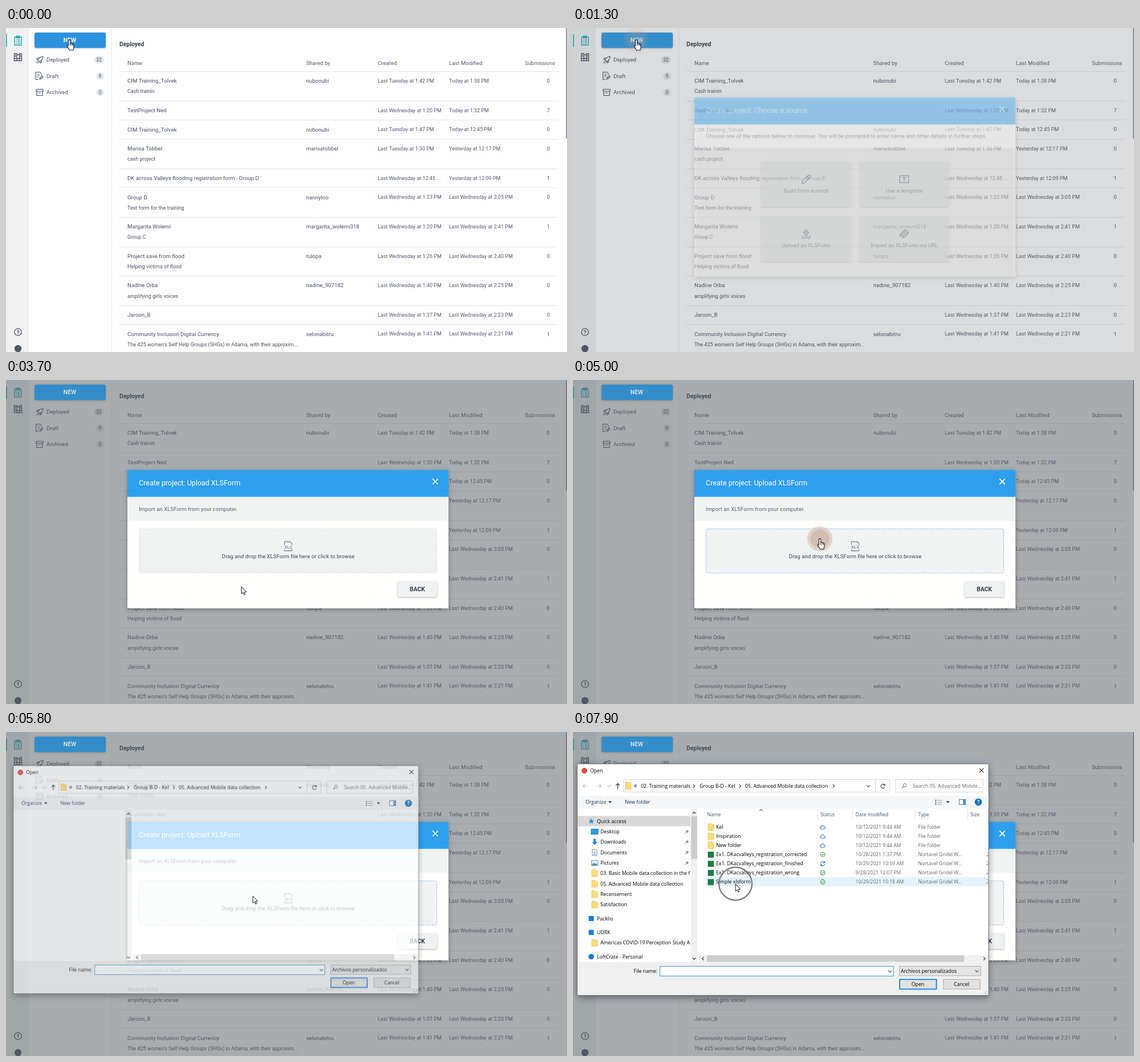
Animation, 984 px wide and 569 px high, one loop 8000 ms. Source, as an HTML page with a canvas:

```html
<!DOCTYPE html>
<html lang="en">
<head>
<meta charset="utf-8">
<title>Upload a form</title>
<style>
html, body { margin: 0; width: 100%; height: 100%; overflow: hidden; background: #fff; }
canvas { display: block; }
</style>
</head>
<body>
<canvas id="stage" width="984" height="569"></canvas>
<script>
const W = 984, H = 569, LOOP = 8000, STEP = 100;
const screen2d = document.getElementById('stage').getContext('2d');
const layer = document.createElement('canvas');
layer.width = W;
layer.height = H;
const layer2d = layer.getContext('2d');
let c = screen2d;

const PAGE = 'Roboto, sans-serif', DIALOG = '"Open Sans", "Noto Sans", sans-serif';
const INK = '#4b5260', SOFT = '#575e6b', BLUE = '#2f9fed';
const clamp = v => Math.max(0, Math.min(1, v));
const mix = (a, b, p) => a + (b - a) * p;

// ---- drawing helpers ----
function text(s, x, y, size = 9.67, color = INK, align = 'left', weight = 400, family = PAGE) {
  c.font = `${weight} ${size}px ${family}`;
  c.textAlign = align;
  c.fillStyle = color;
  c.fillText(s, x, y + size * 0.355);
}
const label = (s, x, y, color = '#000', align = 'left', size = 8.7) =>
  text(s, x, y, size, color, align, 400, DIALOG);

function rect(x, y, w, h, fill, stroke, lw = 1) {
  if (fill) { c.fillStyle = fill; c.fillRect(x, y, w, h); }
  if (stroke) { c.strokeStyle = stroke; c.lineWidth = lw; c.strokeRect(x, y, w, h); }
}
function round(x, y, w, h, r, fill) {
  c.beginPath();
  c.roundRect(x, y, w, h, r);
  c.fillStyle = fill;
  c.fill();
}
function disc(x, y, r, fill) {
  c.beginPath();
  c.arc(x, y, r, 0, 7);
  c.fillStyle = fill;
  c.fill();
}
function circle(x, y, r, color, lw = 1) {
  c.beginPath();
  c.arc(x, y, r, 0, 7);
  c.strokeStyle = color;
  c.lineWidth = lw;
  c.stroke();
}
// Path given relative to (x, y)
function path(d, x, y, stroke, lw = 1.2, fill) {
  c.save();
  c.translate(x, y);
  const p = new Path2D(d);
  if (fill) { c.fillStyle = fill; c.fill(p); }
  if (stroke) {
    c.strokeStyle = stroke;
    c.lineWidth = lw;
    c.lineJoin = 'round';
    c.stroke(p);
  }
  c.restore();
}
function shadowed(color, blur, dy, draw) {
  c.save();
  c.shadowColor = color;
  c.shadowBlur = blur;
  c.shadowOffsetY = dy;
  draw();
  c.restore();
}
function clipped(x, y, w, h, draw) {
  c.save();
  c.beginPath();
  c.rect(x, y, w, h);
  c.clip();
  draw();
  c.restore();
}
const cross = (x, y, r, color, lw) => path(`M${-r} ${-r}L${r} ${r}M${r} ${-r}L${-r} ${r}`, x, y, color, lw);
const chevron = (x, y, color = '#555', turn = 0) => {
  c.save();
  c.translate(x, y);
  c.rotate(turn * Math.PI / 2);
  path('M-2.8 -1.5L0 1.5L2.8 -1.5', 0, 0, color, 1.1);
  c.restore();
};

// ---- project list page ----
const ROWS = [
  ['CIM Training_Tolvek', 'Cash trainin', 'nubonubi', 'Last Tuesday at 1:42 PM', 'Today at 1:38 PM', 0],
  ['TestProject Ned', '', '', 'Last Wednesday at 1:20 PM', 'Today at 1:32 PM', 7],
  ['CIM Training_Tolvek', '', 'nubonubi', 'Last Tuesday at 1:47 PM', 'Today at 12:45 PM', 0],
  ['Marisa Tobbel', 'cash project', 'marisatobbel', 'Last Tuesday at 1:30 PM', 'Yesterday at 12:17 PM', 0],
  ['DK across Valleys flooding registration form - Group D', '', '', 'Last Wednesday at 12:45 ...', 'Yesterday at 12:09 PM', 1],
  ['Group D', 'Test form for the training', 'nannyloo', 'Last Wednesday at 1:23 PM', 'Last Wednesday at 3:05 PM', 0],
  ['Margarita Wolemi', 'Group C', 'margarita_wolemi318', 'Last Wednesday at 1:20 PM', 'Last Wednesday at 2:41 PM', 1],
  ['Project save from flood', 'Helping victims of flood', 'tulopa', 'Last Wednesday at 1:26 PM', 'Last Wednesday at 2:40 PM', 0],
  ['Nadine Orba', 'amplifying girls voices', 'nadine_907182', 'Last Wednesday at 1:40 PM', 'Last Wednesday at 2:25 PM', 0],
  ['Jaroon_B', '', '', 'Last Wednesday at 1:37 PM', 'Last Wednesday at 2:23 PM', 0],
  ['Community Inclusion Digital Currency', 'The 425 women\u2019s Self Help Groups (SHGs) in Adama, with their approxim...',
    'selonabitru', 'Last Wednesday at 1:41 PM', 'Last Wednesday at 2:21 PM', 1]
];

function rail() {
  rect(0, 0, 40, H, '#f0f2f2');
  rect(0, 11, 1.6, 22, '#1bb4c0');
  const teal = '#19a9b5';
  path('M-6 -6H6V8H-6ZM-3 -8H3V-4.5H-3ZM-3.5 -1H-2M-.5 -1H3.5M-3.5 2H-2M-.5 2H3.5M-3.5 5H-2M-.5 5H3.5', 21, 22, teal, 1.3);
  path('M-6.5 -6H-2V6.5H-6.5ZM-2 -4H2.5V6.5H-2ZM2.5 -6H6.5V6.5H2.5ZM-6.5 2.5H6.5M-4.3 -4V0M4.5 -4V0', 21, 51, INK, 1.3);
  circle(21, 534, 6.2, INK, 1.3);
  text('?', 21, 534.3, 9.5, INK, 'center', 700);
  disc(21, 563, 6.2, '#505764');
}

function sidebar() {
  rect(185, 0, 1, H, '#e9ebec');
  path('M6 -6Q0 -6 -3 1L-1 3Q6 0 6 -6ZM-2.5 -1H-5.5L-3.5 -3.5H-.5M1 2.5V5.5L3.5 3.5V.5M-3.5 2.5L-6 5.5M-1.5 4L-3 6', 59, 56, INK, 1.1);
  path('M4 -1V-4L2 -6.5H-5.5V6.5H-1M-3 -3H1M-3 0H1M-3 3H-1M1 6L1.5 3.5L5.5 -.2L7 1.5L3 5.5Z', 58, 84, INK, 1.1);
  path('M-6 -5.5H6V-2H-6ZM-5 -2V5.5H5V-2M-2 1H2', 59, 113, INK, 1.2);
  [['Deployed', 32, 56, 163], ['Draft', 6, 84.5, 165], ['Archived', 0, 113, 165]].forEach(([name, n, y, x]) => {
    text(name, 71, y, 9.75);
    const w = n > 9 ? 17 : 13;
    round(x - w / 2, y - 6.5, w, 13, 6.5, '#e3e6e9');
    text(n, x, y, 8.3, INK, 'center');
  });
}

function table() {
  text('Deployed', 199, 28, 10.35, '#353c49', 'left', 700);
  [['Name', 213], ['Shared by', 526.5], ['Created', 652], ['Last Modified', 777]].forEach(([s, x]) => text(s, x, 61.5, 9.67, SOFT));
  text('Submissions', 963, 61.5, 9.2, SOFT, 'right');
  let y = 76;
  for (const [name, note, user, made, changed, n] of ROWS) {
    rect(199, Math.round(y), 769, 1, '#e4e6e8');
    const mid = y + 16.8;
    text(name, 213, mid);
    text(note, 213, y + 35.3, 9);
    text(user, 526.5, mid);
    text(made, 652, mid, 9.05, SOFT);
    text(changed, 777, mid, 9.05, SOFT);
    text(n, 951, mid, 9.3, SOFT, 'center');
    y += note ? 51.6 : 33.7;
  }
  rect(982, 0, 2, 194, '#9da3b3');
}

function newButton(dim) {
  shadowed('rgba(0,0,0,.25)', 3, 1, () => round(50, 8, 125, 27, 3, dim ? '#348dca' : '#2c92dd'));
  text('NEW', 112, 21.3, 10.4, dim ? '#cfdde8' : '#f4f9fd', 'center', 700);
}

// ---- modals ----
function modal(top, head, bar, bottom, title, hint) {
  shadowed('rgba(0,0,0,.28)', 8, 2, () => rect(213, top, 563, bottom - top, '#fefefd'));
  rect(213, top, 563, head - top, BLUE);
  rect(213, head, 563, bar - head, '#f2f3f3');
  text(title, 233, top + 22.8, 12.55, '#fff');
  cross(753, top + 20.3, 4.8, '#fff', 1.7);
  text(hint, 233, (head + bar) / 2, 9.67, SOFT);
}

function tile(x, y, name, icon, hover) {
  shadowed('rgba(0,0,0,.3)', 3, 1, () => round(x, y, 158.5, 82, 3, hover ? '#e5e9eb' : '#f1f3f3'));
  const ink = hover ? '#2e3542' : '#596171';
  path(icon, x + 79, y + 33.5, ink, 1.5);
  text(name, x + 79, y + 53.5, 9.67, ink, 'center');
}

function sourceModal(hover) {
  modal(122, 169.5, 210.5, 437, 'Create project: Choose a source',
    'Choose one of the options below to continue. You will be prompted to enter name and other details in further steps.');
  tile(330, 232, 'Build from scratch', 'M-7.5 7.5L-6.5 3L3.5 -6.8Q5 -8 6.5 -6.5Q8 -5 6.8 -3.5L-3 6.5ZM1.5 -4.5L4.5 -1.5');
  tile(502, 232, 'Use a template', 'M-8 -6H8V6H-8ZM-3.5 -2.8H3.5M0 -2.8V3.5');
  tile(330, 328, 'Upload an XLSForm', 'M-6 3V7.5H6V3M-1.5 4.5V-2H-4.5L0 -7L4.5 -2H1.5V4.5Z', hover);
  tile(502, 328, 'Import an XLSForm via URL', 'M-7 1L0 -6.5H4L-7 4.5ZM7 -1L0 6.5H-4L7 -4.5Z');
}

function uploadModal(hover) {
  modal(158, 205.5, 247, 401, 'Create project: Upload XLSForm', 'Import an XLSForm from your computer.');
  round(233, 261, 523, 78, 3, '#f1f3f3');
  c.save();
  c.setLineDash([2.2, 1.8]);
  c.beginPath();
  c.roundRect(233.5, 261.5, 522, 77.5, 3);
  c.strokeStyle = hover ? '#6fb3e8' : '#dcdfe1';
  c.lineWidth = 0.9;
  c.stroke();
  c.restore();
  path('M-6.5 -2V-8H3.5L6.5 -5V-2M-6.5 5V8H6.5V5', 495, 292, '#8b9099', 1.3);
  text('XLS', 495, 293.6, 7.6, '#8b9099', 'center', 700);
  text('Drag and drop the XLSForm file here or click to browse', 495, 310, 9.67, '#3f4653', 'center');
  shadowed('rgba(0,0,0,.32)', 3, 1, () => round(687, 354, 69, 27, 3, '#f1f3f3'));
  text('BACK', 721.5, 367.2, 10.35, '#353b47', 'center', 700);
}

// ---- file dialog ----
const TREE = [
  [156.5, 'Quick access', 'star', 42], [175, 'Desktop', 'screen', 48], [193, 'Downloads', 'down', 48],
  [211.5, 'Documents', 'doc', 48], [230, 'Pictures', 'image', 48],
  [248, '03. Basic Mobile data collection in the f', 'folder', 48],
  [266.5, '05. Advanced Mobile data collection', 'folder', 48],
  [285, 'Recensement', 'folder', 48], [303, 'Satisfaction', 'folder', 48],
  [327.5, 'Packlio', 'square', 42], [352, 'UDRK', 'square', 42],
  [370, 'Americas COVID-19 Perception Study A', 'folder', 48], [394.5, 'LoftCrate - Personal', 'disc', 42]
];
const SHEET = 'Nortavel Gridel W...';
const FILES = [
  ['Kel', 'cloud', '10/12/2021 9:44 AM'],
  ['Inspiration', 'cloud', '10/12/2021 9:44 AM'],
  ['New folder', 'cloud', '10/12/2021 9:44 AM'],
  ['Ex1. DKacvalleys_registration_corrected', 'ok', '10/28/2021 1:37 PM'],
  ['Ex1. DKacvalleys_registration_finished', 'sync', '10/29/2021 10:59 AM'],
  ['Ex1. DKacvalleys_registration_wrong', 'ok', '9/28/2021 12:07 PM'],
  ['Simple xlsform', 'ok', '10/29/2021 10:18 AM']
];

const folder = (x, y) => path('M-5 -6H1L2 -4.5H5V6H-5Z', x, y, '#e8c35a', 0.8, '#fbdc7d');
const ICONS = {
  folder,
  star: (x, y) => path('M0 -5L1.5 -1.6L5 -1.3L2.3 1L3.2 4.6L0 2.7L-3.2 4.6L-2.3 1L-5 -1.3L-1.5 -1.6Z', x, y, 0, 0, '#2b92d8'),
  screen: (x, y) => rect(x - 6, y - 4.5, 12, 9, '#2a9fe4', '#1673b5'),
  down: (x, y) => path('M-2 -5.5H2V0H5L0 5.5L-5 0H-2Z', x, y, 0, 0, '#2f86d2'),
  doc: (x, y) => path('M-4 -5.5H2L4 -3.5V5.5H-4ZM-2 -1H2M-2 1.5H2M-2 3.5H2', x, y, '#6f8ca8', 1, '#fff'),
  image: (x, y) => {
    rect(x - 5.5, y - 4.5, 11, 9, '#dff0fb', '#8298ab');
    path('M-5 4L-1.5 -.5L1 2L3 .5L5 4Z', x, y, 0, 0, '#3b93c9');
  },
  square: (x, y) => rect(x - 4.5, y - 4.5, 9, 9, '#1f7fd0'),
  disc: (x, y) => disc(x, y, 4.8, '#1476cf'),
  cloud: (x, y) => path('M-3 3.2H3Q5 2.5 4 .5Q3.5 -.5 2.4 -.3Q1.7 -3 -.5 -2.8Q-2.3 -2.5 -2.4 -.6Q-4.6 -.4 -4.4 1.6Q-4 3.2 -3 3.2Z', x, y, '#2b7cc4', 1.1),
  ok: (x, y) => { circle(x, y, 3.9, '#3a9b50', 1.1); path('M-1.8 .1L-.4 1.6L2 -1.3', x, y, '#3a9b50', 1.1); },
  sync: (x, y) => path('M-3.6 -.6A3.6 3.6 0 0 1 3 -2.2M3.6 .6A3.6 3.6 0 0 1 -3 2.2M3.4 -4.2V-1.6H.8M-3.4 4.2V1.6H-.8', x, y, '#2b7cc4', 1.2)
};
const pin = (x, y) => {
  path('M0 -3.5L3.5 0L2 .3L0 2.5L-2.7 -.2L-.4 -2Z', x, y, 0, 0, '#8a929a');
  path('M-1.5 1.5L-4 4', x, y, '#8a929a', 1);
};

function dialogFrame(ready) {
  shadowed('rgba(0,0,0,.45)', 11, 3, () => rect(7.5, 56, 721.5, 406.5, '#fff'));
  rect(8, 404, 721, 58, '#f0f0f0');
  rect(207, 135, 11, 269, '#f0f0f0');
  rect(207, 148, 11, ready ? 75 : 186, '#cdcdcd');
  chevron(212.5, 142, '#444', 2);
  chevron(212.5, 398, '#444');
  rect(221, 392, 507, 12, '#f0f0f0');
  rect(235, 392, 451, 11.5, '#cdcdcd');
  disc(20, 68, 5, '#dd4b3e');
  label('Open', 30, 68);
  cross(716.5, 67.5, 3.7, '#222', 1.1);
  rect(7.5, 56, 721.5, 406.5, null, '#70757c');
}

// Footer controls before they are painted
function blanks() {
  [[106, 411, 42], [152, 411, 410], [572, 411, 143], [572, 434, 66], [649, 434, 66]]
    .forEach(([x, y, w]) => rect(x, y, w, 18, '#fbfbfb'));
}

function navBar() {
  path('M4.5 0H-4.5L-1 -3.5M-4.5 0L-1 3.5', 22, 95, '#c6c6c6');
  path('M-4.5 0H4.5L1 -3.5M4.5 0L1 3.5', 45, 95, '#c6c6c6');
  chevron(63, 95, '#c6c6c6');
  path('M0 4.5V-4.5L-3.5 -1M0 -4.5L3.5 -1', 78.5, 95, '#444', 1.3);
  rect(88.5, 83.5, 466.5, 22, '#fff', '#d9d9d9');
  rect(530, 84, 1, 21, '#d9d9d9');
  folder(97, 94.5);
  label('\u00ab', 106.5, 93.5, '#222', 'left', 12);
  [['02. Training materials', 119, 212], ['Group B-D - Kel', 222, 293], ['05. Advanced Mobile data collection', 302, 457]].forEach(([s, x, end]) => {
    label(s, x, 95);
    chevron(end, 95, '#444', 3);
  });
  chevron(518, 95);
  path('M3.2 -1.5A3.5 3.5 0 1 0 3.4 1.2M3.6 -4V-1.2H.8', 543.5, 95, '#444', 1.1);
  rect(565.5, 83.5, 153.5, 22, '#fff', '#d9d9d9');
  circle(582, 93.5, 2.8, '#777');
  path('M-2 2L-5 5', 582, 93.5, '#777');
  label('Search 05. Advanced Mobile...', 596, 95, '#686868');

  rect(8, 112, 720.5, 22.5, '#f5f6f7');
  label('Organize', 22, 123, '#1e395b');
  path('M-3 -1.5H3L0 2Z', 65, 123, 0, 0, '#1e395b');
  label('New folder', 91, 123, '#1e395b');
  for (let i = 0; i < 3; i++) {
    rect(635, 119 + i * 3.5, 2.5, 2, '#6c7a8c');
    rect(639, 119.5 + i * 3.5, 8, 1, '#8a96a5');
  }
  path('M-3 -1.5H3L0 2Z', 657.5, 123, 0, 0, '#333');
  rect(677.5, 118.5, 11, 9, '#fff', '#5b7fa6');
  rect(684, 119, 4, 8, '#4b9bdc');
  disc(711, 123, 6.3, '#1470b8');
  text('?', 711, 123.2, 9, '#fff', 'center', 700);
}

function tree() {
  rect(8, 147.5, 198, 18, '#d9d9d9');
  clipped(8, 135, 198, 268, () => TREE.forEach(([y, name, icon, x], i) => {
    ICONS[icon](x - 10, y);
    label(name, x, y);
    if (i > 0 && i < 5) pin(200, y);
  }));
}

function files(hover) {
  [['Name', 235], ['Status', 434], ['Date modified', 495.5], ['Type', 605.5], ['Size', 697]].forEach(([s, x]) => label(s, x, 145, '#46566e'));
  [429, 490, 600, 692].forEach(x => rect(x, 136, 1, 18, '#e2e2e2'));
  chevron(330, 137, '#777', 2);
  if (hover) rect(233, 255, 495, 16, '#e5f2fa');
  FILES.forEach(([name, state, date], i) => {
    const y = 167 + i * 16.05, isDir = i < 3;
    if (isDir) folder(242, y);
    else rect(236.5, y - 5, 10.5, 10.5, '#1e7a47');
    label(name, 251, y);
    ICONS[state](438, y);
    label(date, 495.5, y, '#666', 'left', 8.55);
    label(isDir ? 'File folder' : SHEET, 605.5, y, '#666', 'left', 8.55);
    if (!isDir) clipped(690, y - 8, 38, 16, () => label('2', 725, y, '#666'));
  });
}

function footer(caret) {
  chevron(228, 398, '#333', 1);
  chevron(721.5, 398, '#333', 3);
  rect(152.5, 411.5, 409.5, 17, '#fff', '#4a94c4');
  rect(572.5, 411.5, 142.5, 16.5, '#e4e4e4', '#adadad');
  rect(573, 434.5, 64.5, 17, '#e1e1e1', '#0f7ad6', 1.7);
  rect(649.5, 434.5, 64.5, 17, '#e1e1e1', '#adadad');
  label('File name:', 148, 420, '#000', 'right');
  chevron(556, 420.5);
  label('Archivos personalizados', 575, 420);
  chevron(708.5, 420);
  label('Open', 605, 443, '#000', 'center');
  label('Cancel', 681.5, 443, '#000', 'center');
  for (let row = 0; row < 3; row++)
    for (let col = 0; col <= row; col++) rect(725 - col * 2.5, 454 + row * 2.5, 1.3, 1.3, '#b5b5b5');
  if (caret) rect(155, 414, 1, 12, '#000');
}

function dialog(t, hover) {
  const p = clamp((t - 5700) / 200), s = mix(0.97, 1, p), ready = t >= 5800;
  c = layer2d;
  c.clearRect(0, 0, W, H);
  dialogFrame(ready);
  if (ready) {
    navBar();
    footer(t >= 6030 && Math.floor((t - 6030) / 530) % 2 === 0);
  } else blanks();
  if (t >= 5900) tree();
  if (t >= 6000) files(hover);
  c = screen2d;
  c.save();
  c.globalAlpha = mix(0.42, 1, p);
  c.translate(368, 259);
  c.scale(s, s);
  c.drawImage(layer, -368, -259);
  c.restore();
}

// ---- pointer ----
const MOVES = [
  [0, 111, 21], [1400, 111, 21], [2300, 384, 340], [2400, 396, 351], [2500, 396, 351], [2800, 413, 357],
  [3500, 413, 357], [3600, 413, 363], [4000, 413, 363], [4400, 433, 279], [5600, 433, 279], [5700, 433, 288],
  [6200, 433, 288], [6400, 421, 286], [6600, 418, 279], [6700, 418, 279], [7200, 285, 267], [LOOP, 285, 267]
];
const CLICKS = [[600, 111, 21], [2950, 413, 357], [4600, 433, 279], [7700, 285, 267]];

function pointerAt(t) {
  const i = MOVES.findIndex(m => m[0] > t);
  const [t0, x0, y0] = MOVES[i - 1], [t1, x1, y1] = MOVES[i];
  const p = (t - t0) / (t1 - t0), e = p * p * (3 - 2 * p);
  return [mix(x0, x1, e), mix(y0, y1, e)];
}

function pointer(x, y, hand) {
  c.save();
  c.translate(x, y);
  if (hand) {
    c.scale(0.92, 1);
    path('M-1.7 9V.7Q0 -1.5 1.7 .7V6Q4 5 4.6 6.7Q6.4 6 7 7.7Q8.6 7.5 8.6 9.5V13Q8.4 15 7.4 18H.4Q-1 14.5 -4.4 11Q-5 8.2 -1.7 10.4ZM1.7 6V10M4.6 6.7V10M7 7.7V10', 0, 0, '#16181c', 1.1, '#fff');
  } else {
    path('M0 0V12.5L2.8 9.9L4.8 14.2L6.6 13.4L4.7 9.2H8.6Z', 0, 0, '#16181c', 1, '#fff');
  }
  c.restore();
}

// A ring closes in on the click point, then turns into a soft spot
function clickMark(t) {
  for (const [start, x, y] of CLICKS) {
    const dt = t - start;
    if (dt < 0 || dt >= 750) continue;
    if (dt < 300) {
      circle(x, y - 0.5, 22 + 53 * (1 - dt / 300) ** 1.85, 'rgba(112,112,112,.88)', 2.4);
    } else {
      c.save();
      c.globalAlpha = 1 - clamp((dt - 600) / 150);
      disc(x, y, 22, 'rgba(196,160,138,.38)');
      disc(x, y, 16.5, 'rgba(190,160,142,.42)');
      c.restore();
    }
  }
}

function draw(t) {
  const [x, y] = pointerAt(t);
  const overlay = clamp((t - 1250) / 120), upload = t >= 3600;
  const onTile = !upload && x > 330 && y > 328;
  const onZone = upload && y < 339;
  rect(0, 0, W, H, '#fefefe');
  rail();
  sidebar();
  table();
  if (overlay) {
    c.globalAlpha = overlay;
    rect(0, 0, W, H, 'rgba(84,93,99,.5)');
    c.globalAlpha = 1;
  }
  newButton(overlay > 0);
  if (overlay) {
    c.globalAlpha = overlay;
    if (upload) uploadModal(onZone);
    else sourceModal(onTile);
    c.globalAlpha = 1;
  }
  if (t >= 5700) dialog(t, y < 271);
  clickMark(t);
  pointer(x, y, y < 36 || onTile || (onZone && t < 5700));
}

let last = -1;
function tick(now) {
  const t = Math.floor(now % LOOP / STEP) * STEP;
  if (t !== last) draw(last = t);
  requestAnimationFrame(tick);
}
requestAnimationFrame(tick);
</script>
</body>
</html>
```
